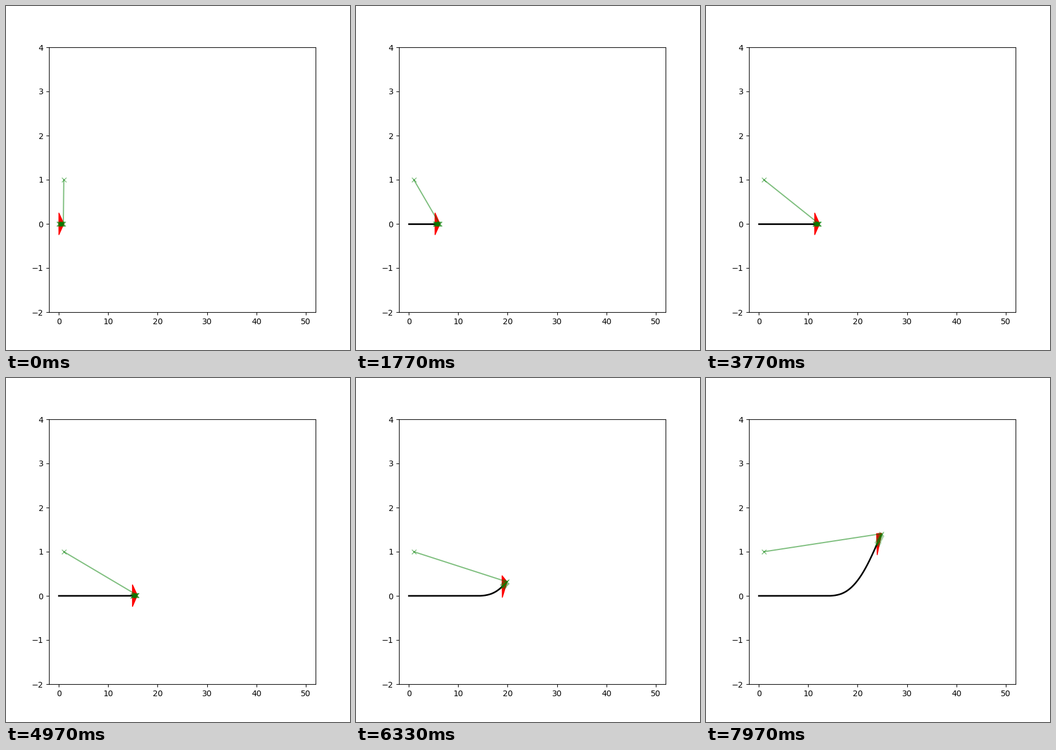
Write a matplotlib script that moves like this. It is 600x600 px and loops after 8000 ms.

```python
import numpy as np
import matplotlib.pyplot as plt
from matplotlib.animation import FuncAnimation
from matplotlib.patches import Polygon

FRAMES = 240
LOOP_MS = 8000
STEP = 0.1       # distance driven per frame
HORIZON = 10     # predicted positions ahead of the vehicle

# Road slope along x: straight, then steering smoothly to the left
KNOT_X = [14, 15, 16.25, 17.5, 18.75, 20, 21.25, 22.5, 23.9, 25]
KNOT_SLOPE = [0, 0.011, 0.030, 0.064, 0.103, 0.146, 0.191, 0.231, 0.259, 0.277]

xs = STEP * np.arange(FRAMES + HORIZON)
slope = np.interp(xs, KNOT_X, KNOT_SLOPE)
ys = np.concatenate([[0], np.cumsum((slope[1:] + slope[:-1]) / 2 * STEP)])
heading = np.arctan(slope)

BODY = np.array([[0, 0.25], [0, -0.25], [1, 0]])

fig, ax = plt.subplots(figsize=(6, 6), dpi=100)
ax.set_xlim(-2, 52)
ax.set_ylim(-2, 4)

vehicle = ax.add_patch(Polygon(BODY, closed=True, fc="r", ec="r", lw=1))
track, = ax.plot([], [], "k-", lw=2)
plan, = ax.plot([], [], "x-", color="green", alpha=0.5)


def body_at(n):
    c, s = np.cos(heading[n]), np.sin(heading[n])
    return BODY @ np.array([[c, s], [-s, c]]) + [xs[n], ys[n]]


def update(n):
    vehicle.set_xy(body_at(n))
    track.set_data(xs[:n + 1], ys[:n + 1])
    ahead = slice(n, n + HORIZON)
    # The plan's last entry stays at (1, 1)
    plan.set_data(np.append(xs[ahead], 1), np.append(ys[ahead], 1))
    return vehicle, track, plan


anim = FuncAnimation(fig, update, frames=FRAMES, interval=LOOP_MS / FRAMES,
                     init_func=lambda: update(0), repeat=True, repeat_delay=0)
plt.show()
```
